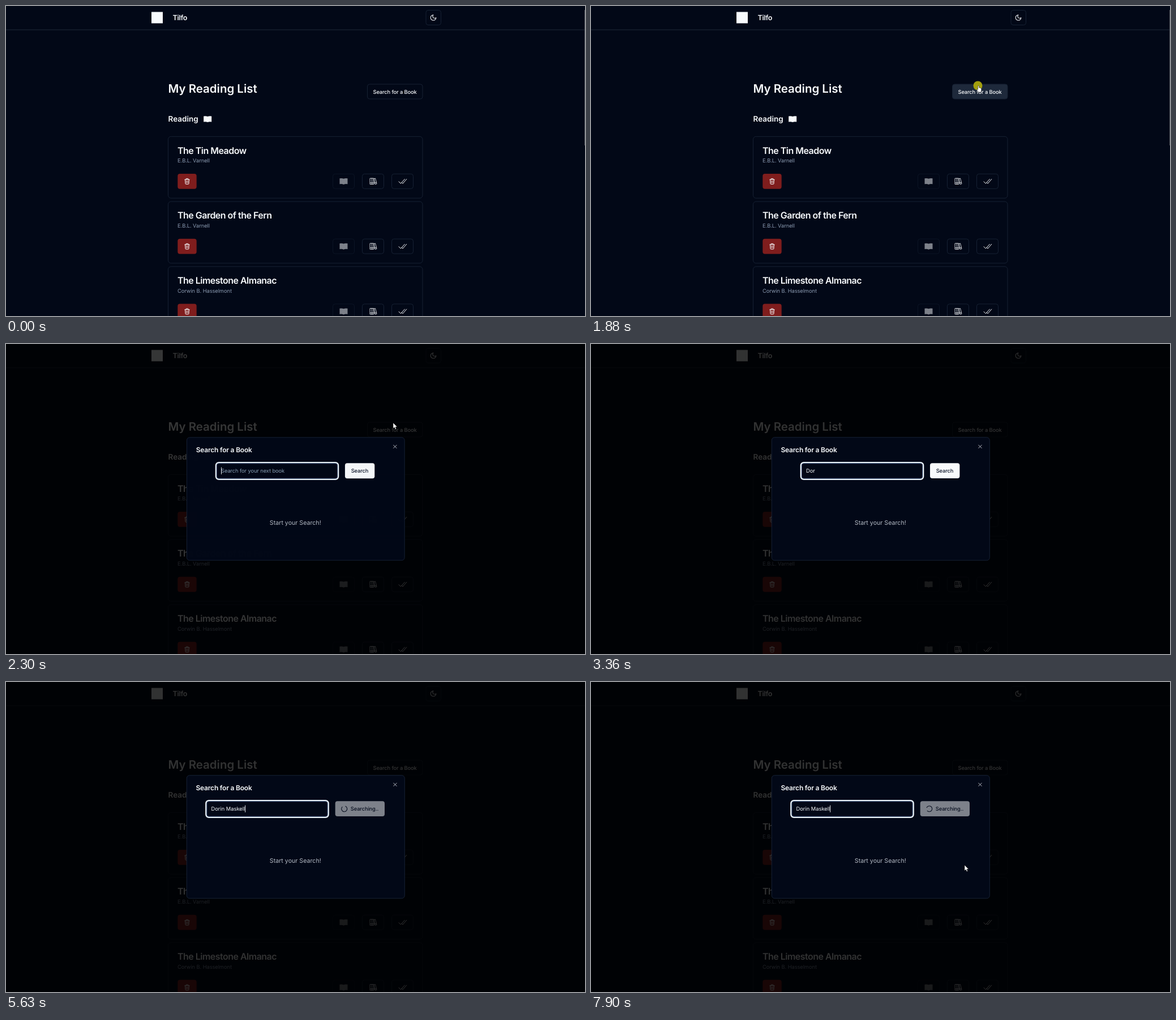
Animation of 1023 by 547 pixels, one loop 8 s. Source, as an HTML page:

```html
<!DOCTYPE html>
<html lang="en">
<head>
<meta charset="utf-8">
<title>Reading list</title>
<style>
  html, body { margin: 0; width: 100%; height: 100%; overflow: hidden; background: #020817; }
  svg { display: block; width: 100%; height: 100%; }
  text { font: 400 9.33px Inter, "Open Sans", sans-serif; fill: #f8fafc; text-rendering: geometricPrecision; white-space: pre; }
  .brand { font-size: 12.6px; font-weight: 600; letter-spacing: -.3px; }
  .h1 { font-size: 20.5px; font-weight: 600; letter-spacing: -.03px; }
  .h2 { font-size: 13.5px; font-weight: 600; }
  .book { font-size: 16px; font-weight: 600; letter-spacing: -.52px; }
  .author { fill: #8b9ab0; letter-spacing: -.08px; }
  .label { font-weight: 500; letter-spacing: -.13px; text-anchor: middle; }
  .dark { fill: #0f172a; }
  .dialog-title { font-size: 12px; font-weight: 600; letter-spacing: -.2px; }
  .hint { fill: #8ba0b5; letter-spacing: -.1px; }
  .start { font-size: 10.67px; fill: #b4bac4; text-anchor: middle; }
  .box { fill: none; stroke: #162133; stroke-width: 1; }
  .line { fill: none; stroke: #f8fafc; stroke-width: 1; stroke-linecap: round; stroke-linejoin: round; }
  .white { fill: #f8fafc; }
</style>
</head>
<body>
<svg viewBox="0 0 1023 547" preserveAspectRatio="none">
  <defs>
    <path id="pages" d="M-7-5Q-3-5.8 0-4.5Q3-5.8 7-5V5Q3 4.3 0 5.6Q-3 4.3-7 5Z"/>
    <path id="trash" class="line" d="M-4.2-3H4.2M-1.8-3V-4.7H1.8V-3M-3.4-3L-3 4Q-2.9 5-2 5H2Q2.9 5 3 4L3.4-3M-1.2-.7V2.7M1.2-.7V2.7"/>
    <path id="shelf" class="line" style="stroke-width:.85" d="M-5.5-5.2H.9V5.2H-5.5ZM-2.3-5.2V5.2M1.1-4.5L3.5-5.2L6 4.4L3.5 5.1ZM-5.5 2.6H.9M2.9 2.6L5.2 2"/>
    <path id="checks" class="line" d="M-6.7.5L-3.3 4L3.7-3.8M-1.2 2.5L.3 4L7-3.8"/>
    <g id="card">
      <rect class="box" x="286.5" y=".5" width="449.5" height="108.8" rx="5"/>
      <rect x="303.3" y="66.3" width="33.4" height="26.6" rx="4" fill="#7f1d1d"/>
      <use href="#trash" x="320" y="79.5"/>
      <g opacity=".5">
        <rect class="box" x="577.5" y="66.5" width="38" height="26" rx="4"/>
        <use href="#pages" class="white" x="596.5" y="79.5"/>
      </g>
      <rect class="box" x="629.5" y="66.5" width="38" height="26" rx="4"/>
      <use href="#shelf" x="649" y="79.5"/>
      <rect class="box" x="681.5" y="66.5" width="38" height="26" rx="4"/>
      <use href="#checks" x="700.7" y="79.5"/>
    </g>
  </defs>

  <rect width="1023" height="547" fill="#020817"/>

  <rect class="white" x="257" y="10.5" width="20" height="20"/>
  <text class="brand" x="294.5" y="25">Tilfo</text>
  <rect class="box" x="742" y="7.5" width="26.5" height="26" rx="4"/>
  <path class="line" transform="translate(748.6 14.1) scale(.535)" style="stroke-width:2" d="M12 3a6 6 0 0 0 9 9 9 9 0 1 1-9-9Z"/>
  <rect y="41.5" width="1023" height="1" fill="#1e293b"/>
  <rect id="scrollbar" x="1022" y="7" width="1" height="239" fill="#50555d"/>

  <text class="h1" x="286.5" y="153.2">My Reading List</text>
  <rect id="open" class="box" x="638.5" y="138" width="97.5" height="26" rx="4"/>
  <text class="label" x="687" y="154.7">Search for a Book</text>
  <text class="h2" x="286.5" y="203.8">Reading</text>
  <use href="#pages" class="white" x="356.2" y="199.5"/>
  <g id="cards"></g>

  <rect id="shade" width="1023" height="547" fill="#000"/>

  <g id="dialog">
    <rect x="319.3" y="164.8" width="385" height="217" rx="5" fill="#020817" stroke="#172236"/>
    <text class="dialog-title" x="335.5" y="191.4">Search for a Book</text>
    <path class="line" style="stroke:#b6bbc4" d="M684.7 178.2l5.6 5.6m0-5.6l-5.6 5.6"/>
    <g id="field">
      <rect x="370.9" y="209.2" width="216.2" height="29.6" rx="5" fill="#020817" stroke="#e9f1f8" stroke-width="2.5"/>
      <rect x="372.7" y="211" width="212.6" height="26" rx="3.5" fill="none" stroke="#16305c" stroke-width=".9"/>
      <text id="hint" class="hint" x="380" y="227.4">Search for your next book</text>
      <text id="typed" x="380" y="227.4"></text>
      <rect id="caret" class="white" y="217.5" width=".9" height="12.5"/>
    </g>
    <g id="ready">
      <rect class="white" x="599" y="210.3" width="52.4" height="26.8" rx="4"/>
      <text class="label dark" x="625" y="227.4">Search</text>
    </g>
    <g id="busy" opacity=".5">
      <rect class="white" x="581.7" y="210.3" width="87.3" height="26.8" rx="4"/>
      <path id="spinner" class="line" style="stroke:#0f172a;stroke-width:1.1" d="M5 0A5 5 0 1 1 1.55-4.75"/>
      <text class="label dark" x="633.5" y="227.4">Searching..</text>
    </g>
    <text class="start" x="511.3" y="318.8">Start your Search!</text>
  </g>

  <circle id="halo" cx="683.5" cy="140.5" r="8" fill="#a39f0e"/>
  <g id="pointer">
    <path id="arrow" d="M0 0V10L2.3 7.9L3.9 11.4L5.6 10.7L4.1 7.3H7.2Z" fill="#fff" stroke="#000" stroke-width=".5"/>
    <path id="hand" d="M-.4 .9Q.6-.1 1.5 .9V4.2Q2.4 3.7 3 4.5Q4 4.1 4.5 5Q5.5 4.8 5.7 6V8.5Q5.7 10.2 4.7 12H.3Q-1.2 9.8-2.4 7.6Q-2.2 6.3-.4 7.4Z" fill="#fff" stroke="#111" stroke-width=".5"/>
  </g>
</svg>
<script>
  const LOOP = 8000, START = 1050, STEP = 207.27, BLINK = 1060;
  // The scene advances in steps; these are the steps where something happens.
  const CLICK = 4, OPEN = 5, TYPE = 9, RESUME = 15, SUBMIT = 22, RETURN = 23;
  const QUERY = 'Dorin Maskell', WORD = QUERY.indexOf(' ');
  const BOOKS = [
    ['The Tin Meadow', 'E.B.L. Varnell'],
    ['The Garden of the Fern', 'E.B.L. Varnell'],
    ['The Limestone Almanac', 'Corwin B. Hasselmont']
  ];
  // step, x, y
  const STOPS = [
    [-1, 722, 350], [CLICK, 684, 140], [6, 684, 139], [7, 765, 174],
    [RETURN, 745, 252], [26, 660, 338], [29, 660, 323]
  ];

  const $ = id => document.getElementById(id);
  const show = (id, on) => $(id).style.display = on ? '' : 'none';
  const clamp = (v, lo, hi) => Math.min(hi, Math.max(lo, v));
  const smooth = u => u * u * (3 - 2 * u);

  $('cards').innerHTML = BOOKS.map(([title, author], i) => `
    <g transform="translate(0 ${229.8 + 114.75 * i})">
      <use href="#card"/>
      <text class="book" x="303" y="30.8">${title}</text>
      <text class="author" x="303" y="46.7">${author}</text>
    </g>`).join('');

  function pointerAt(n) {
    const i = clamp(STOPS.findIndex(s => s[0] > n), 0, STOPS.length) || STOPS.length - 1;
    const [a, x0, y0] = STOPS[i - 1], [b, x1, y1] = STOPS[i];
    const u = smooth(clamp((n - a) / (b - a), 0, 1));
    return [x0 + (x1 - x0) * u, y0 + (y1 - y0) * u];
  }

  // One letter per step, with a rest after the first word.
  const lettersAt = n => n < RESUME
    ? clamp(n - TYPE + 1, 0, WORD)
    : Math.min(n - RESUME + WORD + 3, QUERY.length);

  function caretOn(n, t) {
    if (n >= TYPE && n < SUBMIT) return false;
    const since = START + STEP * (n < SUBMIT ? OPEN : SUBMIT);
    return (t - since) % BLINK < BLINK / 2;
  }

  function drawPointer(n, t, opened) {
    const [x, y] = pointerAt(n);
    const hover = !opened && y < 164;
    show('pointer', t >= 430 && (n < TYPE || n >= RETURN));
    $('pointer').setAttribute('transform', `translate(${x} ${y})`);
    show('hand', hover);
    show('arrow', !hover);
    show('halo', n === CLICK);
    $('open').style.fill = hover ? '#1e293b' : 'none';
  }

  function drawDialog(n, t) {
    const p = n < OPEN ? 0 : 1 - .12 ** (n - OPEN + 1);
    $('shade').setAttribute('opacity', .8 * p ** 1.5);
    $('dialog').setAttribute('opacity', p);
    $('dialog').setAttribute('transform',
      `translate(511.7 273.3) scale(${.95 + .05 * p}) translate(-511.7 -273.3)`);

    const count = lettersAt(n), busy = n >= SUBMIT;
    $('typed').textContent = QUERY.slice(0, count);
    show('hint', !count);
    show('caret', caretOn(n, t));
    $('caret').setAttribute('x', 380 + (count ? $('typed').getComputedTextLength() : 0));
    $('field').setAttribute('transform', `translate(${busy ? -17.5 : 0} 0)`);
    show('ready', !busy);
    show('busy', busy);
    $('spinner').setAttribute('transform', `translate(597.7 223.8) rotate(${116 + 90 * n})`);
  }

  function draw(t) {
    const n = Math.max(-1, Math.floor((t - START) / STEP));
    const opened = n >= OPEN;
    show('scrollbar', !opened);
    show('dialog', opened);
    drawPointer(n, t, opened);
    drawDialog(n, t);
  }

  const begin = performance.now();
  function frame() {
    draw((performance.now() - begin) % LOOP);
    requestAnimationFrame(frame);
  }
  frame();
</script>
</body>
</html>
```
